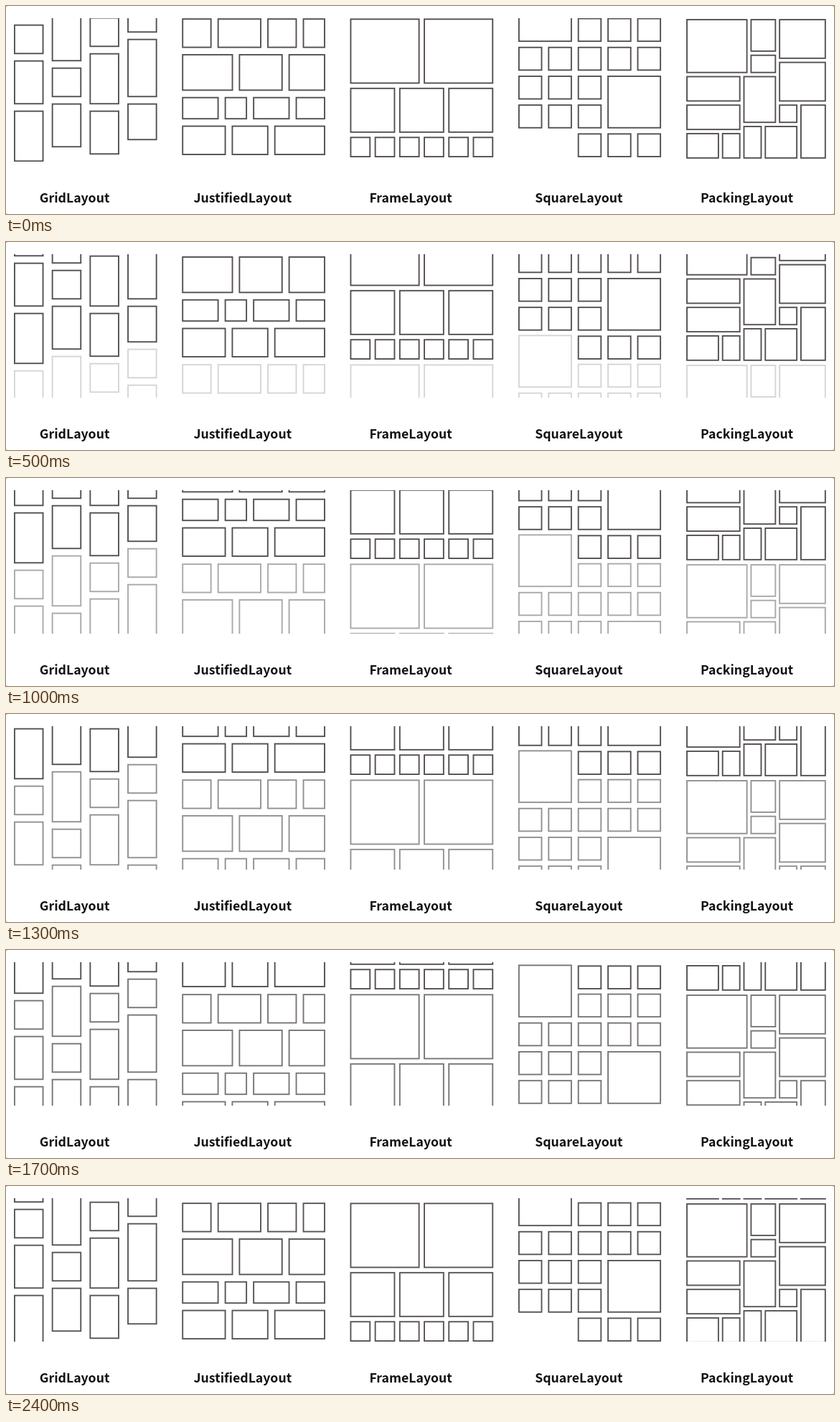
Recreate the animation shown at these times as an HTML page. Size 1154 px wide and 290 px high, loop 2500 ms.

```html
<!DOCTYPE html>
<html lang="en">
<head>
<meta charset="utf-8">
<title>Layouts</title>
<style>
  html, body { margin: 0; width: 100%; height: 100%; overflow: hidden; background: #999; }
  svg { display: block; }
  .tile { fill: none; stroke: #544f50; stroke-width: 1.9; }
  text {
    font: 700 17.7px "Noto Sans CJK KR", "Noto Sans CJK JP", "Noto Sans", sans-serif;
    text-anchor: middle;
    fill: #111;
  }
</style>
</head>
<body>
<svg width="1154" height="290" viewBox="0 0 1154 290">
  <defs>
    <clipPath id="view"><rect y="17" width="1154" height="200"/></clipPath>
  </defs>
  <rect width="1154" height="290" rx="2.5" fill="#fff"/>
  <g clip-path="url(#view)">
    <g id="current"></g>
    <g id="next"></g>
  </g>
  <g id="labels"></g>
</svg>
<script>
const LOOP = 2500, STEP = 100, PAGE = 200, TOP = 17, STROKE = 1.9;
const PANEL_LEFT = 11, PANEL_PITCH = 234.25, PANEL_WIDTH = 199.7;
const byId = id => document.getElementById(id);

function add(parent, tag, attributes, text = '') {
  const node = document.createElementNS('http://www.w3.org/2000/svg', tag);
  for (const name in attributes) node.setAttribute(name, attributes[name]);
  node.textContent = text;
  parent.append(node);
}

// Puts each [width, height] block on the lowest, leftmost spot of the skyline.
function pack(blocks, skyline) {
  return blocks.map(([w, h]) => {
    const y = Math.min(...skyline), x = skyline.indexOf(y);
    skyline.fill(y + h, x, x + w);
    return { x, y, w, h };
  });
}

// Every layout returns tiles as [x, y, width, height] within its panel.
function gridTiles() {
  const heights = [4, 7, 4, 4, 8, 7, 6, 4, 6, 5, 7, 6];
  const skyline = [0, 1, 2, 3].map(column => -(column % 2) * 2 - (column >> 1));
  const blocks = heights.map(height => [1, height + 1]);
  return pack(blocks, skyline).map(({ x, y, h }) =>
    [x * 52.7, 8.7 + y * 10, 41.5, h * 10 - 8.5]);
}

function justifiedTiles() {
  const widths = [4, 6, 4, 3, 7, 6, 5, 5, 3, 5, 4, 6, 5, 7], heights = [4, 5, 3, 4];
  const sum = list => list.reduce((a, b) => a + b, 0);
  const size = units => units * 9.96 + 1.5;
  const tiles = [];
  let row = [], y = .2;
  for (const units of widths) {
    row.push(units);
    if (sum(row) < 17) continue;
    const sizes = row.map(size), height = heights.shift();
    const gap = (PANEL_WIDTH - sum(sizes)) / (row.length - 1);
    let x = 0;
    for (const width of sizes) {
      tiles.push([x, y, width, size(height)]);
      x += width + gap;
    }
    y += (height + 1) * 9.96;
    row = [];
  }
  return tiles;
}

function frameTiles() {
  const gap = 5.5, tiles = [];
  let y = .4;
  for (const count of [2, 3, 6]) {
    const pitch = (PANEL_WIDTH + gap) / count, width = pitch - gap;
    const height = Math.min(width, 91);
    for (let i = 0; i < count; i++) tiles.push([i * pitch, y, width, height]);
    y += height + gap;
  }
  return tiles;
}

// Two double-size squares; single ones fill the cells around them.
function squareTiles() {
  const gap = 7.9, pitchX = 41.4, pitchY = 40.2;
  const square = (column, row, span) => [
    column * pitchX + .2, row * pitchY - .4, span * pitchX - gap, span * pitchY - gap + 1.2
  ];
  const tiles = [square(0, -1, 2), square(3, 2, 2)];
  for (let row = 0; row < 5; row++) {
    for (let column = 0; column < 5; column++) {
      const covered = row % 4 ? row > 1 && column > 2 : column < 2;
      if (!covered) tiles.push(square(column, row, 1));
    }
  }
  return tiles;
}

function packingTiles() {
  const unit = 9.93, gap = 3.9;
  const blocks = [
    [9, 8], [4, 5], [7, 6], [4, 3], [7, 6], [8, 4], [5, 7],
    [8, 4], [3, 3], [4, 8], [3, 5], [5, 5], [5, 4], [3, 4]
  ];
  return pack(blocks, Array(20).fill(0)).map(({ x, y, w, h }) =>
    [x * unit + .1, y * unit + 1.1, w * unit - gap, h * unit - gap]);
}

const panels = {
  GridLayout: gridTiles(),
  JustifiedLayout: justifiedTiles(),
  FrameLayout: frameTiles(),
  SquareLayout: squareTiles(),
  PackingLayout: packingTiles()
};

Object.entries(panels).forEach(([name, tiles], index) => {
  const left = PANEL_LEFT + index * PANEL_PITCH;
  add(byId('labels'), 'text', { x: left + 84.6, y: 274 }, name);
  for (const [x, y, width, height] of tiles) {
    for (const page of ['current', 'next']) {
      add(byId(page), 'rect', {
        class: 'tile', x: left + x + STROKE / 2, y: TOP + y + STROKE / 2,
        width: width - STROKE, height: height - STROKE
      });
    }
  }
});

// Key points of the scroll, joined by a smooth curve that continues over the loop.
const keys = [[0, 0], [300, 26], [700, 68], [1300, 126], [1700, 156], [2100, 180], [2400, 194]];

function keyAt(index) {
  const lap = Math.floor(index / keys.length);
  const [time, scroll] = keys[index - lap * keys.length];
  return [time + lap * LOOP, scroll + lap * PAGE];
}

function slopeAt(index) {
  const [t0, y0] = keyAt(index - 1), [t1, y1] = keyAt(index + 1);
  return (y1 - y0) / (t1 - t0);
}

function scrollAt(time) {
  let i = 0;
  while (time >= keyAt(i + 1)[0]) i++;
  const [t0, y0] = keyAt(i), [t1, y1] = keyAt(i + 1);
  const span = t1 - t0, u = (time - t0) / span, v = 1 - u;
  return y0 * v * v * (1 + 2 * u) + y1 * u * u * (1 + 2 * v)
    + span * u * v * (slopeAt(i) * v - slopeAt(i + 1) * u);
}

function draw(now) {
  const time = Math.floor(now % LOOP / STEP) * STEP;
  const scroll = Math.round(scrollAt(time));
  byId('current').setAttribute('transform', `translate(0 ${-scroll})`);
  byId('next').setAttribute('transform', `translate(0 ${PAGE - scroll})`);
  byId('next').setAttribute('opacity', scroll / PAGE);
  requestAnimationFrame(draw);
}
draw(performance.now());
</script>
</body>
</html>
```
